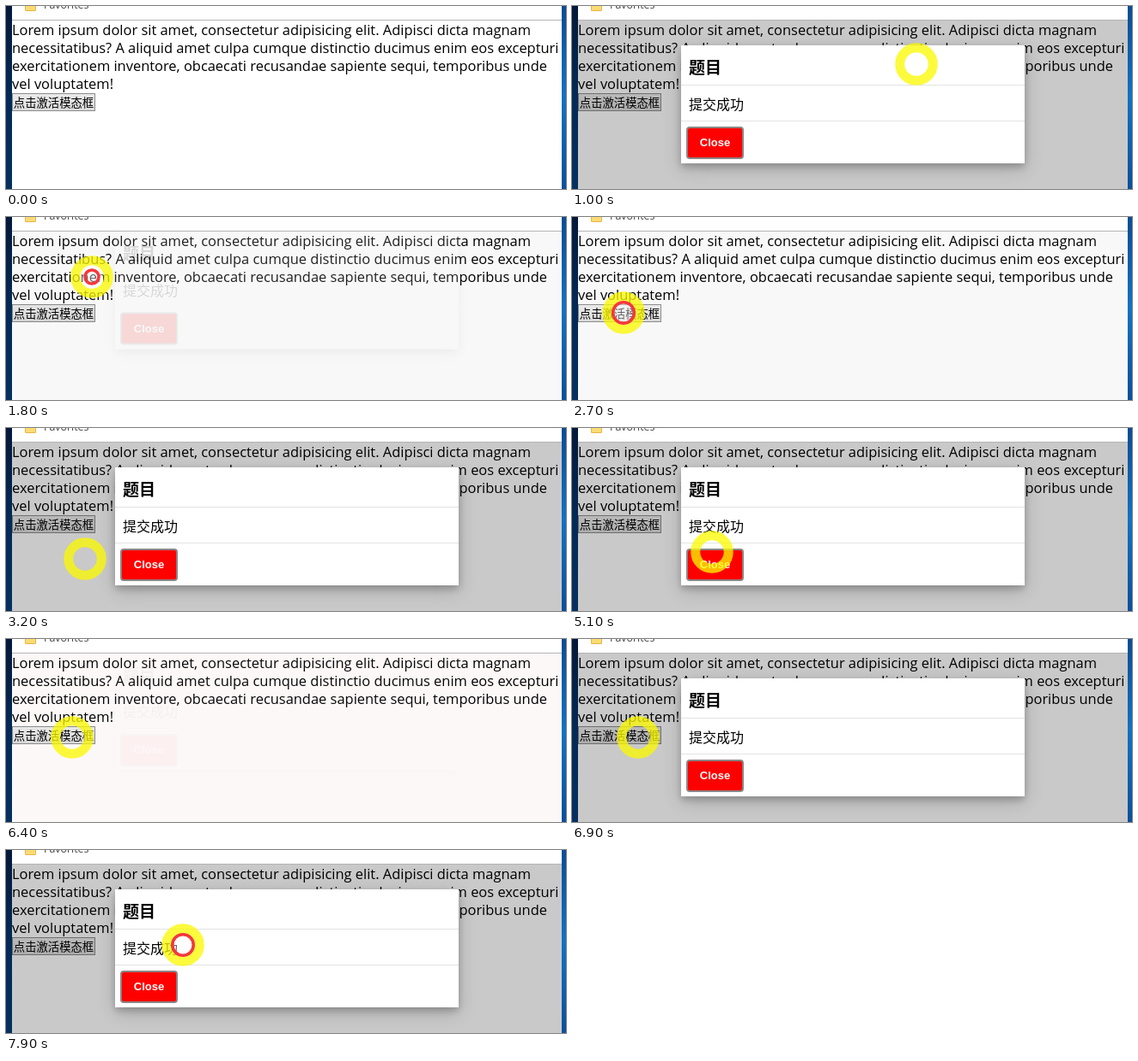
An HTML page for the animation above (8 s loop, 652x214 px).

```html
<!DOCTYPE html>
<html lang="en">
<head>
<meta charset="utf-8">
<title>Modal dialog</title>
<style>
  html, body { margin: 0; width: 100%; height: 100%; overflow: hidden; }
  body { position: relative; background: #fff; color: #000; }
  div, svg, p, h3, span, button { position: absolute; box-sizing: border-box; margin: 0; white-space: nowrap; }
  .edge { top: 0; height: 214px; }
  #left { left: 0; width: 7px; background: linear-gradient(#04193a, #042a56 50%, #05305f); }
  #right { left: 647px; width: 5px; background: linear-gradient(#0a4c94, #1272c4 50%, #0a4f9a); }
  #bar { left: 7px; top: 0; width: 640px; height: 17px; background: #fff; border-bottom: 1px solid #b4b4b4; overflow: hidden; }
  #folder { left: 15px; top: -5px; width: 13px; height: 11px; background: #fcdc72; border: 1px solid #e3b548; border-radius: 1px; }
  #bar span { left: 37px; top: -10px; font: 12.4px/17px "Open Sans", sans-serif; color: #444; }
  #page { left: 7px; top: 17px; width: 640px; height: 197px; overflow: hidden; }
  #copy { left: 0; top: 0; font: 16.45px/21px "Open Sans", "Noto Sans", sans-serif; }
  #open { left: 0; top: 85px; width: 97px; height: 21px; padding: 0; border: 1px solid #8c8c8c; background: linear-gradient(#ebebeb, #dadada);
    font: 13.33px/19px "Noto Sans CJK SC", "Noto Sans CJK", sans-serif; color: #000; text-align: center; }
  #shade { inset: 0; background: rgba(0, 0, 0, .21); }
  #modal { left: 120px; top: 29px; width: 400px; height: 138px; background: #fff;
    box-shadow: 0 4px 8px rgba(0, 0, 0, .2), 0 6px 20px rgba(0, 0, 0, .19);
    font: 16px/22px "Noto Sans CJK SC", "Noto Sans CJK", sans-serif; }
  #modal h3 { left: 9px; top: 13px; font-size: 19px; line-height: 24px; font-weight: 700; }
  #modal p { left: 9px; top: 57px; }
  .rule { left: 0; width: 400px; height: 1px; background: #e3e3e3; }
  #close { left: 6px; top: 95px; width: 67px; height: 38px; padding: 0; border: 2px solid #8d8585; border-radius: 4px; background: #f00; color: #fff;
    font: 700 13px/34px "Liberation Sans", Arial, sans-serif; text-align: center; }
  #cursor { left: -30px; top: -30px; width: 60px; height: 60px; }
</style>
</head>
<body>
<div id="left" class="edge"></div>
<div id="right" class="edge"></div>
<div id="bar"><div id="folder"></div><span>Favorites</span></div>
<div id="page">
  <p id="copy">Lorem ipsum dolor sit amet, consectetur adipisicing elit. Adipisci dicta magnam<br>necessitatibus? A aliquid amet culpa cumque distinctio ducimus enim eos excepturi<br>exercitationem inventore, obcaecati recusandae sapiente sequi, temporibus unde<br>vel voluptatem!</p>
  <button id="open" tabindex="-1">点击激活模态框</button>
  <div id="shade"></div>
  <div id="modal">
    <h3>题目</h3>
    <div class="rule" style="top:46px"></div>
    <p>提交成功</p>
    <div class="rule" style="top:88px"></div>
    <button id="close" tabindex="-1">Close</button>
  </div>
</div>
<svg id="cursor" viewBox="-30 -30 60 60">
  <circle r="19.25" fill="none" stroke="#fbf900" stroke-width="11" stroke-opacity=".76"/>
  <g id="press">
    <circle r="13" fill="#fff" fill-opacity=".4"/>
    <circle id="ring" fill="none" stroke="#f5383c" stroke-width="3.6"/>
  </g>
</svg>
<script>
const LOOP = 8000, STEP = 100;
const GLIDE = 400, FADE = 345, DROP = 30;

// The dialog opens and closes in turn at these times.
const TOGGLES = [500, 1500, 2700, 3500, 4490, 5500, 6390];

// Where the pointer comes to rest, and whether it then clicks.
const STOPS = [
  { at: 100, x: 625, y: 25 },
  { at: 500, x: 60, y: 112, click: true },
  { at: 1000, x: 401, y: 68, click: true },
  { at: 1600, x: 100, y: 70, click: true },
  { at: 2600, x: 60, y: 112, click: true },
  { at: 3200, x: 92, y: 153 },
  { at: 4200, x: 84, y: 119 },
  { at: 5100, x: 163, y: 145, click: true },
  { at: 6400, x: 77, y: 115, click: true },
  { at: 7300, x: 166, y: 112 },
  { at: 7800, x: 206, y: 111, click: true }
];

const el = id => document.getElementById(id);
const clamp = v => Math.min(1, Math.max(0, v));
const mix = (a, b, u) => a + (b - a) * u;

const visibility = t => TOGGLES.reduce(
  (sum, start, i) => sum + (i % 2 ? -1 : 1) * clamp((t - start) / FADE), 0);

function drawDialog(t) {
  const p = visibility(t);
  el("shade").style.opacity = p;
  el("modal").style.opacity = p;
  el("modal").style.transform = `translateY(${-DROP * (1 - p * p)}px)`;
  // A closed page keeps a slight tint once the dialog has been shown.
  const tint = t < 4000 ? "#f8f8f8" : "#fffafa";
  el("page").style.background = t > TOGGLES[1] && p < .05 ? tint : "#fff";
}

function drawPointer(t) {
  const i = Math.max(0, STOPS.findLastIndex(s => s.at <= t));
  const here = STOPS[i], next = STOPS[i + 1] || here;
  const u = clamp((t - next.at + GLIDE) / GLIDE);
  el("cursor").style.transform = `translate(${mix(here.x, next.x, u)}px, ${mix(here.y, next.y, u)}px)`;
  el("cursor").style.visibility = t < STOPS[0].at ? "hidden" : "visible";

  const held = (t - here.at) / STEP;
  const pressed = here.click && held >= 1 && held < 3;
  el("press").style.display = pressed ? "" : "none";
  if (pressed) el("ring").setAttribute("r", 16.5 - 4.25 * held);
}

function tick() {
  const t = Math.floor((performance.now() % LOOP) / STEP) * STEP;
  drawDialog(t);
  drawPointer(t);
  requestAnimationFrame(tick);
}
tick();
</script>
</body>
</html>
```
